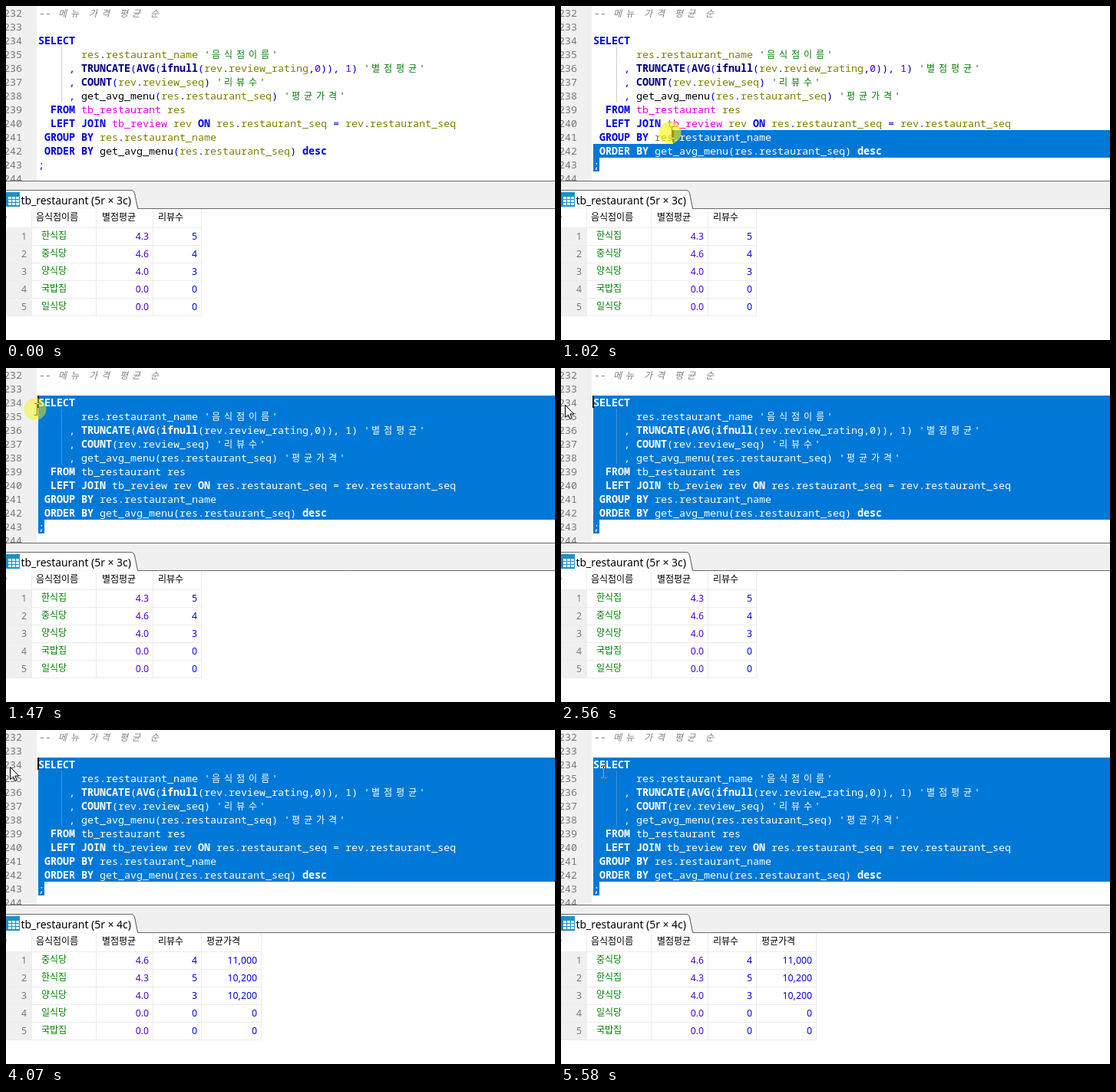
An HTML page with a canvas that plays this animation: 715 px wide and 436 px high, repeating every 5.65 s.

```html
<!DOCTYPE html>
<html lang="ko">
<head>
<meta charset="utf-8">
<title>Query run</title>
<style>
html, body { margin: 0; width: 100%; height: 100%; overflow: hidden; background: #fff; }
canvas { display: block; }
</style>
</head>
<body>
<canvas id="stage" width="715" height="436"></canvas>
<script>
const ctx = document.getElementById('stage').getContext('2d');
const W = 715, H = 436, LOOP = 5650;
const MONO = '13.333px "Noto Sans Mono", "DejaVu Sans Mono", monospace';
const HANGUL = '12px "Noto Sans CJK KR", "Noto Sans CJK", sans-serif';
const UI = '"Noto Sans", "Open Sans", sans-serif';
const LEFT = 42, COL = 8, ROW = 18, FIRST = 232;
const BLUE = '#0078d7', GRAY = '#f0f0f0', GRID = '#ececec', EDGE = '#6a6a6a';

const LINES = [
  '-- 메뉴 가격 평균 순',
  '',
  'SELECT',
  "       res.restaurant_name '음식점이름'",
  "     , TRUNCATE(AVG(ifnull(rev.review_rating,0)), 1) '별점평균'",
  "     , COUNT(rev.review_seq) '리뷰수'",
  "     , get_avg_menu(res.restaurant_seq) '평균가격'",
  '  FROM tb_restaurant res',
  '  LEFT JOIN tb_review rev ON res.restaurant_seq = rev.restaurant_seq',
  ' GROUP BY res.restaurant_name',
  ' ORDER BY get_avg_menu(res.restaurant_seq) desc',
  ';',
  ''
];
const LAST = 11;

// [pattern, colour, font prefix]
const STYLES = [
  [/^--/, '#808080', 'italic '],
  [/^'/, '#008000', ''],
  [/^(SELECT|FROM|LEFT|JOIN|ON|GROUP|BY|ORDER|desc)$/, '#0000e6', 'bold '],
  [/^(TRUNCATE|AVG|ifnull|COUNT)$/, '#000080', 'bold '],
  [/^tb_/, '#e600e6', ''],
  [/^get_/, '#000', ''],
  [/^\d/, '#4b00d2', ''],
  [/^[a-z]/, '#7f7f00', ''],
  [/./, '#0000d0', '']
];

const TOKENS = LINES.map(line =>
  (line.match(/--.*|'[^']*'|\s+|\w+|./g) || []).map(text => {
    const [, color, face] = STYLES.find(s => s[0].test(text));
    return { text, color, face };
  }));

const HEADERS = [['음식점이름', 39], ['별점평균', 125], ['리뷰수', 198], ['평균가격', 261]];
const EDGES = [33, 117, 191, 254, 332];
const BEFORE = [
  ['한식집', '4.3', '5'], ['중식당', '4.6', '4'], ['양식당', '4.0', '3'],
  ['국밥집', '0.0', '0'], ['일식당', '0.0', '0']
];
const AFTER = [
  ['중식당', '4.6', '4', '11,000'], ['한식집', '4.3', '5', '10,200'],
  ['양식당', '4.0', '3', '10,200'], ['일식당', '0.0', '0', '0'], ['국밥집', '0.0', '0', '0']
];

// Pointer path: time, x, y
const PATH = [
  [70, 623, 428], [250, 440, 345], [420, 270, 248], [570, 219, 222], [640, 218, 222],
  [870, 218, 222], [960, 180, 204], [1050, 126, 146], [1140, 73, 88], [1230, 52, 66],
  [1340, 41, 54.4], [1440, 41, 54.4], [1470, 40, 53.5], [1730, 40, 53.5], [1860, 20, 50],
  [2020, 5, 48], [4300, 5, 48], [4450, 32, 54], [4530, 55, 55], [4580, 77, 52],
  [4700, 280, 150], [4830, 557, 323], [4880, 570, 350], [5060, 618, 440]
];
const PRESS = 870, RELEASE = 1500, DRAG_END = 1470, TRAIL = 4530, RESULT = 2960;
const BLINKS = [2020, 2560, 2920, 3020, 3560, 4070, 4580, 5060, 5580];

function rect(x, y, w, h, color) {
  ctx.fillStyle = color;
  ctx.fillRect(x, y, w, h);
}

function label(text, x, y, font, color, align = 'left') {
  ctx.font = font;
  ctx.fillStyle = color;
  ctx.textAlign = align;
  ctx.fillText(text, x, y);
}

function codeLine(i, color) {
  let x = LEFT;
  for (const t of TOKENS[i]) {
    for (const ch of t.text) {
      const wide = ch >= '가' && ch <= '힣';
      if (ch !== ' ') {
        label(ch, x + (wide ? 2 : 0), i * ROW + 14, t.face + (wide ? HANGUL : MONO), color || t.color);
      }
      x += wide ? COL * 2 : COL;
    }
  }
  if (i > 2 && i < 7) {
    for (let y = 0; y < ROW; y += 2) rect(72, i * ROW + y, 1, 1, '#a0a0a0');
  }
}

function pointer(t) {
  if (t < PATH[0][0] || t > PATH[PATH.length - 1][0]) return null;
  const i = Math.max(1, PATH.findIndex(p => p[0] >= t));
  const [t0, x0, y0] = PATH[i - 1], [t1, x1, y1] = PATH[i];
  const k = (t - t0) / (t1 - t0);
  return { x: x0 + (x1 - x0) * k, y: y0 + (y1 - y0) * k };
}

// Text position of the caret; the selection runs from it to the end of the code
function caretAt(t) {
  if (t < PRESS) return null;
  const p = pointer(Math.min(t, DRAG_END));
  const row = Math.min(LAST, Math.floor(p.y / ROW));
  const length = [...LINES[row]].reduce((n, ch) => n + (ch >= '가' ? 2 : 1), 0);
  return { row, col: Math.max(0, Math.min(length, Math.round((p.x - LEFT) / COL))) };
}

function editor(t) {
  rect(0, 0, W, 229, '#fff');
  rect(0, 0, 40, 229, GRAY);
  LINES.forEach((_, i) => {
    label(FIRST + i, 21, i * ROW + 14, MONO, '#787878', 'right');
    codeLine(i);
  });
  const caret = caretAt(t);
  if (!caret) return;
  for (let i = caret.row; i <= LAST; i++) {
    const x = LEFT + (i === caret.row ? caret.col * COL : 0);
    const right = i === LAST ? LEFT + COL : W;
    if (x >= right) continue;
    ctx.save();
    ctx.beginPath();
    ctx.rect(x, i * ROW, right - x, ROW);
    ctx.clip();
    rect(x, i * ROW, right - x, ROW, BLUE);
    codeLine(i, '#fff');
    ctx.restore();
  }
  const shown = BLINKS.filter(b => b <= t).length % 2 === 0;
  if (shown) rect(LEFT - 1 + caret.col * COL, caret.row * ROW, 2, 16, '#000');
}

function tab(columns) {
  rect(0, 228, W, 37, GRAY);
  rect(0, 228, W, 1, EDGE);
  ctx.beginPath();
  ctx.moveTo(-1, 240.5);
  ctx.lineTo(163, 240.5);
  ctx.quadraticCurveTo(166.5, 240.5, 167.5, 245);
  ctx.lineTo(171.5, 264.5);
  ctx.lineTo(W, 264.5);
  ctx.strokeStyle = EDGE;
  ctx.lineWidth = 1;
  ctx.stroke();
  ctx.lineTo(-1, 264.5);
  ctx.save();
  ctx.clip();
  rect(0, 241, 172, 24, '#fff');
  ctx.restore();
  ctx.beginPath();
  ctx.moveTo(-1, 240.5);
  ctx.lineTo(163, 240.5);
  ctx.quadraticCurveTo(166.5, 240.5, 167.5, 245);
  ctx.lineTo(171.5, 264.5);
  ctx.lineTo(W, 264.5);
  ctx.stroke();

  rect(0, 243, 18, 19, '#1e90c8');
  for (let r = 0; r < 3; r++) {
    for (let c = 0; c < 3; c++) rect(c * 5 + 3, 249 + r * 4, 4, 3, '#e2f4fc');
  }
  label(`tb_restaurant (5r × ${columns}c)`, 19.5, 259, '13.9px ' + UI, '#000');
}

function grid(rows) {
  const n = rows[0].length, right = EDGES[n];
  rect(0, 265, W, H - 265, '#fff');
  rect(0, 289, 33, 115, GRAY);
  rect(0, 274, 1, 2, '#6db4e8');
  for (let i = 0; i < 6; i++) rect(0, 289 + i * 23, right, 1, GRID);
  for (let i = 0; i <= n; i++) rect(EDGES[i], 265, 1, 140, GRID);
  for (let i = 0; i < n; i++) label(HEADERS[i][0], HEADERS[i][1], 280, HANGUL, '#000');
  rows.forEach((row, i) => {
    const y = 305 + i * 23;
    label(i + 1, 27, y, '12.3px ' + UI, '#787878', 'right');
    label(row[0], 46, y - 1, HANGUL, '#008000');
    for (let c = 1; c < n; c++) {
      label(row[c], EDGES[c + 1] - 5, y, '12.3px ' + UI, c === 1 ? '#4b00d2' : '#0000e6', 'right');
    }
  });
}

function beam(x, y) {
  x = Math.round(x);
  y = Math.round(y);
  ctx.globalCompositeOperation = 'difference';
  for (const top of [y - 8, y + 7]) {
    rect(x - 3, top, 3, 1, '#fff');
    rect(x + 1, top, 3, 1, '#fff');
  }
  rect(x, y - 7, 1, 14, '#fff');
  ctx.globalCompositeOperation = 'source-over';
}

function arrow(x, y) {
  const shape = [[0, 0], [0, 16], [4, 12.5], [6.5, 18], [8.8, 17], [6.3, 11.5], [11.3, 11.5]];
  ctx.beginPath();
  for (const [dx, dy] of shape) ctx.lineTo(Math.round(x) + 0.5 + dx, Math.round(y) + 0.5 + dy);
  ctx.closePath();
  ctx.fillStyle = '#fff';
  ctx.fill();
  ctx.strokeStyle = '#000';
  ctx.lineWidth = 1;
  ctx.stroke();
}

function mouse(t) {
  const p = pointer(t);
  if (t >= TRAIL) beam(55, 55); // trail left behind by the pointer
  if (!p) return;
  if (p.y > 228 || p.x < 38) arrow(p.x, p.y);
  else if (t < TRAIL || t >= TRAIL + 20) beam(p.x, p.y);
  if (t >= PRESS && t < RELEASE) {
    ctx.beginPath();
    ctx.arc(p.x - 2, p.y, 14.5, 0, Math.PI * 2);
    ctx.fillStyle = `rgba(250, 243, 10, ${t < DRAG_END ? 0.62 : 0.48})`;
    ctx.fill();
  }
}

function draw(t) {
  const rows = t < RESULT ? BEFORE : AFTER;
  editor(t);
  tab(rows[0].length);
  grid(rows);
  mouse(t);
}

const start = performance.now();
function tick() {
  const t = (performance.now() - start) % LOOP;
  draw(Math.floor(t / 10) * 10);
  requestAnimationFrame(tick);
}
tick();
</script>
</body>
</html>
```
